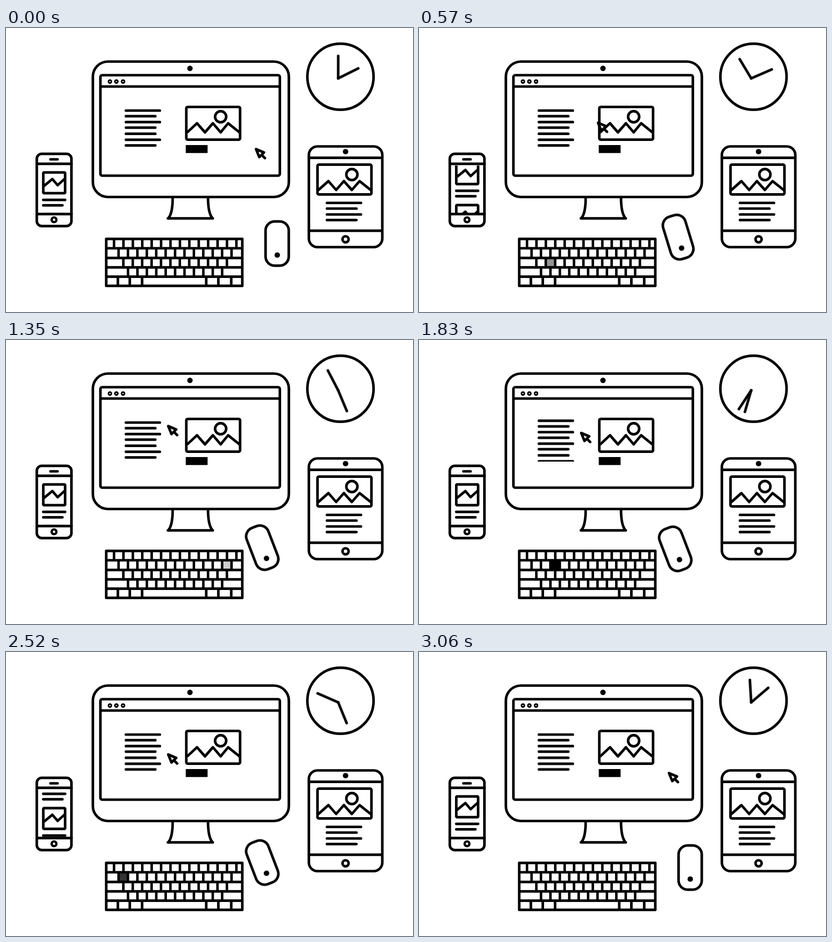
An HTML page without scripts for the animation above (3090 ms loop, 895 px wide and 626 px high).

```html
<!DOCTYPE html>
<html lang="en">
<head>
<meta charset="utf-8">
<title>Responsive desk</title>
<style>
  html, body { margin: 0; width: 100%; height: 100%; overflow: hidden; background: #fff; }
  svg { display: block; width: 100%; height: 100%; }
  .ink { fill: none; stroke: #000; stroke-width: 5.7; stroke-linecap: round; stroke-linejoin: round; }
  .dot { fill: #000; stroke: none; }
  .flat { stroke-linecap: butt; }

  .move { animation: 3090ms cubic-bezier(.333, 0, .667, 1) infinite; }
  .phone-feed { animation-name: feed; }
  .page-text { animation-name: page; }
  .cursor-x { animation-name: cursor-x; }
  .cursor-y { animation-name: cursor-y; }
  .mouse { animation-name: mouse; transform-origin: 596.3px 475px; }
  .hand { animation: spin 3090ms linear infinite; transform-origin: 730.5px 111px; }
  .fast { --from: 63deg; --to: 1503deg; }
  .slow { --from: 0deg; --to: 360deg; }
  .keys rect { width: 20.7px; height: 21px; opacity: 0; animation: tap 3090ms linear infinite; }

  @keyframes spin {
    from { transform: rotate(var(--from)); }
    to { transform: rotate(var(--to)); }
  }
  @keyframes feed {
    0%, 12.62% { transform: translateY(0); }
    32.04%, 68.93% { transform: translateY(-92px); }
    88.35%, 100% { transform: translateY(-184px); }
  }
  @keyframes page {
    0%, 52.27% { transform: translateY(0); }
    74.43%, 100% { transform: translateY(89.5px); }
  }
  @keyframes cursor-x {
    0%, 4.85% { transform: translateX(0); }
    23.79%, 82.52% { transform: translateX(-193px); }
    98.06%, 100% { transform: translateX(0); }
  }
  @keyframes cursor-y {
    0%, 4.85% { transform: translateY(0); }
    25.24%, 40.13% { transform: translateY(-78px); }
    82.2%, 82.52% { transform: translateY(-41px); }
    98.06%, 100% { transform: translateY(0); }
  }
  @keyframes mouse {
    0%, 4.85% { transform: translate(0, 0) rotate(0deg); }
    23.79%, 40.13% { transform: translate(-32.8px, -17.5px) rotate(-21deg); }
    82.2%, 82.52% { transform: translate(-32.8px, -11px) rotate(-21deg); }
    98.06%, 100% { transform: translate(0, 0) rotate(0deg); }
  }
  @keyframes tap {
    0% { opacity: 0; }
    3.24% { opacity: 1; }
    8.09%, 100% { opacity: 0; }
  }
</style>
</head>
<body>
<svg viewBox="0 0 895 626">
  <defs>
    <clipPath id="page-clip"><rect x="255" y="173" width="95" height="94.3"/></clipPath>
    <clipPath id="phone-clip"><rect x="72" y="303" width="68" height="105"/></clipPath>
    <path id="lines" d="M263.7 182H338.3M263.7 194.4H328.3M263.7 207.4H338.3M263.7 219.6H328.3M263.7 233.2H328.3M263.7 246.3H338.3M263.7 258.8H328.3"/>
    <g id="card">
      <rect x="82" y="318.3" width="48" height="45.9" rx="2"/>
      <path class="flat" d="M83 348.5 102 333 113.5 346.5 129.5 332"/>
      <path d="M82 378.8H130M82 390.8H124"/>
    </g>
  </defs>

  <g class="ink">
    <!-- clock -->
    <circle cx="735.5" cy="107.4" r="72.8"/>
    <path class="hand fast" d="M730.5 111V61.5"/>
    <path class="hand slow" d="M730.5 111V61.5"/>

    <!-- monitor -->
    <rect x="191" y="74" width="431" height="298.5" rx="33"/>
    <circle class="dot" cx="404.5" cy="89" r="6"/>
    <rect x="207.6" y="104" width="394.6" height="221.5" rx="4"/>
    <path d="M208 129H602"/>
    <g stroke-width="3.2">
      <circle cx="228.5" cy="118" r="3.2"/>
      <circle cx="242.7" cy="118" r="3.2"/>
      <circle cx="257.4" cy="118" r="3.2"/>
    </g>
    <g stroke-width="3.2" style="stroke-width:3.2">
      <circle cx="228.5" cy="118" r="3.2"/>
      <circle cx="242.7" cy="118" r="3.2"/>
      <circle cx="257.4" cy="118" r="3.2"/>
    </g>
    <path d="M366.5 374C366.5 395 364 410 358 418M444.3 374C444.3 395 447 410 453 418M356 419.6H454.7"/>

    <!-- web page -->
    <g clip-path="url(#page-clip)">
      <g class="move page-text">
        <use href="#lines"/>
        <use href="#lines" y="-89.5"/>
      </g>
    </g>
    <rect x="396.5" y="174" width="118.2" height="72.2" rx="3"/>
    <path class="flat" d="M398 230.5 420 210 437.5 230 455 210 472 230 488.5 210 514 230.5"/>
    <circle cx="472" cy="195.6" r="12.2"/>
    <rect class="dot" x="395.3" y="258" width="48" height="17.6"/>
    <g class="move cursor-x">
      <path class="move cursor-y" d="M549.8 267 567.3 274.3 557 284.6ZM562 279.5 569.3 286.8"/>
    </g>

    <!-- phone -->
    <rect x="67.7" y="277.3" width="76.2" height="159.3" rx="11"/>
    <path d="M68 299.3H144M68 410.2H144M97.8 289.5H113.2"/>
    <circle cx="105.6" cy="422.7" r="5.2" style="stroke-width:5.2"/>
    <g clip-path="url(#phone-clip)">
      <g class="move phone-feed">
        <use href="#card"/>
        <use href="#card" y="92"/>
        <use href="#card" y="184"/>
      </g>
    </g>

    <!-- tablet -->
    <rect x="666" y="261" width="161.5" height="222" rx="19"/>
    <path d="M666 286.2H827M666 446.8H827"/>
    <circle class="dot" cx="746.7" cy="272.6" r="6"/>
    <circle cx="746.7" cy="465.7" r="6.7"/>
    <rect x="685" y="301.2" width="118.6" height="65.7" rx="3"/>
    <path class="flat" d="M686.5 357.5 709 337.5 726 357 743 337.5 760.5 357 777.5 337.5 802.5 357.5"/>
    <circle cx="760.6" cy="323" r="12.2"/>
    <path d="M705.8 385.5H780.6M705.8 398H770.6M705.8 411H780.6M705.8 423.3H770.6"/>

    <!-- mouse -->
    <g class="move mouse">
      <rect x="570.8" y="426.3" width="51" height="97.5" rx="20"/>
      <circle class="dot" cx="596.5" cy="500.6" r="6"/>
    </g>
  </g>

  <!-- keyboard -->
  <g class="keys">
    <rect x="330.4" y="527.5" style="animation-delay:230ms"/>
    <rect x="278.7" y="506.5" style="animation-delay:530ms"/>
    <rect x="433.9" y="527.5" style="animation-delay:830ms"/>
    <rect x="475.2" y="485.5" style="animation-delay:1130ms"/>
    <rect x="371.8" y="527.5" style="animation-delay:1430ms"/>
    <rect x="288.9" y="485.5" style="animation-delay:1730ms"/>
    <rect x="402.9" y="506.5" style="animation-delay:2030ms"/>
    <rect x="247.5" y="485.5" style="animation-delay:2390ms"/>
  </g>
  <g class="ink">
    <rect x="220.4" y="464.9" width="299.2" height="103.4"/>
    <path d="M221 485.5H519M221 506.8H519M221 527.6H519M221 548.2H519"/>
    <path d="M246 549V568M272.2 549V568M299.3 549V568M440.3 549V568M467 549V568M495.3 549V568"/>
  </g>
  <!-- each dash is one divider between keys -->
  <g fill="none" stroke="#000" stroke-width="21" stroke-dasharray="5.5 15.2">
    <path d="M234.8 475.2h274.6"/>
    <path d="M244.8 496h253.9"/>
    <path d="M255.3 517h233.2"/>
    <path d="M265.6 538h212.5"/>
  </g>
</svg>
</body>
</html>
```
